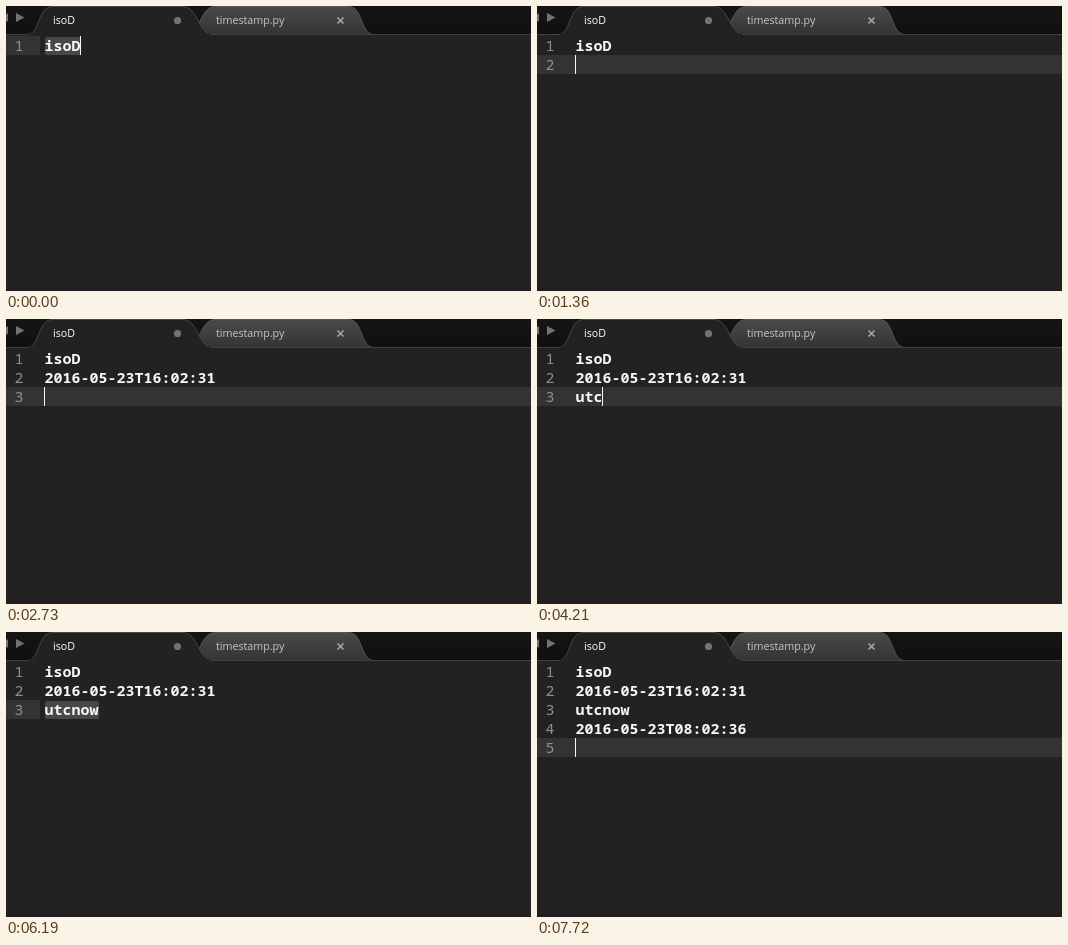
Animation of 525x285 px, one loop 8 s. Source, as an HTML page:

```html
<!DOCTYPE html>
<html lang="en">
<head>
<meta charset="utf-8">
<title>Editor timestamps</title>
<style>
  html, body { margin: 0; width: 100%; height: 100%; overflow: hidden; background: #222; }
  svg { display: block; }
  .code { font: 600 15px "Noto Sans Mono", "DejaVu Sans Mono", monospace; fill: #f8f8f2; white-space: pre; }
  .code .number { font-weight: 400; fill: #8f908a; }
  .label { font: 500 10.7px "Open Sans", "Noto Sans", sans-serif; }
</style>
</head>
<body>
<svg width="525" height="285" viewBox="0 0 525 285">
  <defs>
    <linearGradient id="bar" x2="0" y2="1">
      <stop stop-color="#151515"/><stop offset="1" stop-color="#101010"/>
    </linearGradient>
    <linearGradient id="idle" x2="0" y2="1">
      <stop stop-color="#4a4a4a"/><stop offset="1" stop-color="#343434"/>
    </linearGradient>
  </defs>
  <rect width="525" height="285" fill="#222"/>
  <rect y="281" width="525" height="4" fill="#221e20"/>
  <rect width="525" height="28" fill="url(#bar)"/>
  <path d="M183 28.5C194 27 194 1 209 .5H343C357 1 354 27 367 28.5" fill="url(#idle)" stroke="#555"/>
  <path d="M0 28.5H525" stroke="#414141"/>
  <path d="M22 28.5C34 27 32 1 46 .5H177C192 1 192 27 206 28.5" fill="#222" stroke="#484848"/>
  <path d="M23 28.5H205" stroke="#222" stroke-width="2"/>
  <path d="M2 7V16L-4 11.5ZM10 7V16L18.5 11.5Z" fill="#737373"/>
  <circle cx="171.5" cy="14.5" r="3.6" fill="#737373"/>
  <path d="M331.5 11.5l6 6m0-6l-6 6" stroke="#aaa" stroke-width="1.5"/>
  <text class="label" x="47" y="18" fill="#fff">isoD</text>
  <text class="label" x="210" y="18" fill="#c6c6c6">timestamp.py</text>

  <rect id="rowMark" height="19" fill="#333"/>
  <rect id="selection" x="39" height="18" rx="2" fill="#484848"/>
  <g id="rows" class="code"></g>
  <rect id="caret" width="1" height="19" fill="#f8f8f0"/>
</svg>
<script>
const LOOP = 8000, TOP = 30, LEFT = 38, ROW = 19, CHAR = 9, GUTTER = 34;
const SVG = "http://www.w3.org/2000/svg";
const [rowMark, selection, rows, caret] =
  ["rowMark", "selection", "rows", "caret"].map(id => document.getElementById(id));

const local = "isoD\n2016-05-23T16:02:31";
const query = local + "\nutcnow";
const utc = query + "\n2016-05-23T08:02:36";

// [start, document, whether its last line is selected]
const edits = [
  [0, "isoD", true],
  [1360, "isoD\n"],
  [1780, "isoD\nisoD"],
  [2210, local],
  [2730, local + "\n"],
  ...[3510, 3790, 4210, 4490, 4640, 4760].map((start, i) => [start, query.slice(0, i - 5 || undefined)]),
  [5570, query, true],
  [6440, query + "\n"],
  [6870, query + "\nutcnow"],
  [7290, utc],
  [7720, utc + "\n"]
];

// [start, caret opacity]; every edit makes the caret solid again
const fades = [
  [430, .7], [580, .25], [700, 0], [840, .3], [960, .75], [1080, 1],
  [2080, .7], [2610, .7],
  [3120, .7], [3240, .25], [3360, 0],
  [5190, .7], [5310, .25], [5430, 0],
  [6040, .4], [6190, 0]
];

const latest = (list, time) => list.filter(([start]) => start <= time).pop();

function set(node, attributes) {
  for (const name in attributes) node.setAttribute(name, attributes[name]);
}

function addText(x, y, content, className = "") {
  const node = document.createElementNS(SVG, "text");
  set(node, { x, y, class: className });
  node.textContent = content;
  rows.append(node);
}

let shown;

function draw(time) {
  const [start, content, selected] = latest(edits, time);
  const lines = content.split("\n");
  const y = TOP + (lines.length - 1) * ROW;
  const width = lines[lines.length - 1].length * CHAR;

  if (shown !== start) {
    shown = start;
    rows.replaceChildren();
    lines.forEach((line, i) => {
      const base = TOP + 15 + i * ROW;
      addText(8.5, base, i + 1, "number");
      addText(LEFT + .5, base, line);
    });
    set(rowMark, { y, width: selected ? GUTTER : 525 });
    set(selection, { y: y + 1, width, visibility: selected ? "visible" : "hidden" });
    set(caret, { x: LEFT + width, y });
  }

  const fade = latest(fades, time);
  set(caret, { opacity: fade && fade[0] > start ? fade[1] : 1 });
}

const origin = performance.now();
function tick() {
  draw((performance.now() - origin) % LOOP);
  requestAnimationFrame(tick);
}
tick();
</script>
</body>
</html>
```
